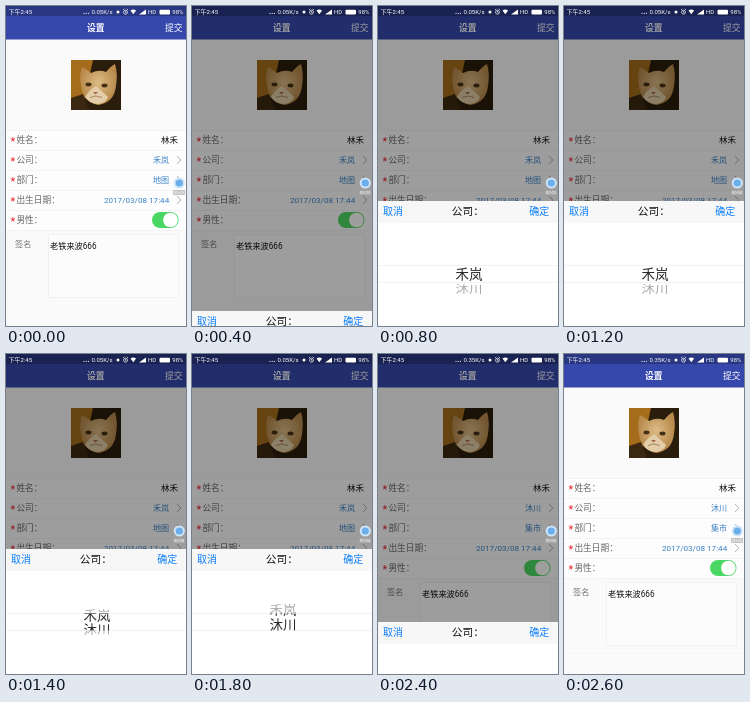
Recreate the animation shown at these times as an HTML page. Size 180 by 320 pixels, loop 2800 ms.

```html
<!DOCTYPE html>
<html lang="zh-CN">
<head>
<meta charset="utf-8">
<title>设置</title>
<style>
  html, body { margin: 0; width: 100%; height: 100%; overflow: hidden; background: #fafafa; }
  svg { display: block; width: 100%; height: 100%; }
  text { font-family: Roboto, "Noto Sans CJK SC", "Noto Sans CJK", sans-serif; }
  .end { text-anchor: end; }
  .mid { text-anchor: middle; }
  .status { font-size: 6px; fill: #fff; }
  .label { font-size: 8.7px; fill: #666; }
  .value { font-size: 8.1px; fill: #3b82c6; }
  .button { font-size: 10px; fill: #087dfa; }
  .wheel { font-size: 13.5px; }
</style>
</head>
<body>
<svg viewBox="0 0 180 320" preserveAspectRatio="none">
  <defs>
    <clipPath id="inside"><path d="M0 64.5h180v17H0z"/></clipPath>
    <clipPath id="outside"><path d="M0 22h180v42.5H0zM0 81.5h180V125H0z"/></clipPath>
    <clipPath id="photo"><path d="M65 54h50v50H65z"/></clipPath>
    <radialGradient id="fur" cy=".45">
      <stop stop-color="#dcbb86"/><stop offset="1" stop-color="#b88a4c"/>
    </radialGradient>
  </defs>

  <rect width="180" height="320" fill="#fafafa"/>
  <rect width="180" height="33.5" fill="#3648ac"/>
  <rect width="180" height="10" opacity=".25"/>
  <text class="mid" x="89.8" y="25.2" font-size="8.8" font-weight="700" fill="#fff">设置</text>
  <text class="end" x="176.5" y="25.2" font-size="8.8" fill="#fff">提交</text>

  <g clip-path="url(#photo)">
    <path d="M65 54h50v50H65z" fill="#2b1d0c"/>
    <path d="M65 54h22l-4 18-7 32H65z" fill="#a56d1b"/>
    <path d="M65 92l12-4 6 16H65z" fill="#3b2810"/>
    <path d="M75 80Q73 70 76 61Q82 64 85 67Q93 63 100 66Q105 60 109 58Q112 68 110 80Q108 97 92 99Q77 96 75 80z" fill="url(#fur)"/>
    <path d="M90 80Q83 84 79 91Q84 98 92 98Q100 97 102 91Q96 85 90 80z" fill="#e2cda8"/>
    <ellipse cx="82.5" cy="78.5" rx="3" ry="1.9" fill="#453015"/>
    <ellipse cx="98.5" cy="79.5" rx="3" ry="1.9" fill="#453015"/>
    <path d="M87 86h5l-2.5 2.5z" fill="#a86250"/>
    <path d="M84 91.5q6-3 12 0" fill="none" stroke="#8a6a46" stroke-width=".7"/>
  </g>

  <rect y="124" width="180" height="100" fill="#fdfdfd"/>
  <g id="rows"></g>
  <rect x="146" y="206" width="26.5" height="16" rx="8" fill="#4bd763"/>
  <circle cx="164.4" cy="214" r="7.3" fill="#fff"/>
  <text x="9" y="241" font-size="8.2" fill="#777">签名</text>
  <rect x="42.5" y="228.5" width="130" height="63" fill="#fcfcfc" stroke="#f1f1f1"/>
  <text x="44" y="243" font-size="8.2" fill="#111">老铁来波666</text>
  <path d="M0 299.5h180" stroke="#f6f6f6"/>

  <rect id="dim" width="180" height="320" opacity=".38"/>

  <g id="panel">
    <rect width="180" height="125" fill="#fff"/>
    <rect width="180" height="22" fill="#f7f7f7"/>
    <text class="button" x="5" y="14">取消</text>
    <text x="73.8" y="14" font-size="10.7" fill="#111">公司：</text>
    <text class="button end" x="171.2" y="14">确定</text>
    <path d="M0 64.5h180M0 81.5h180" stroke="#f2f2f2"/>
    <g class="wheel mid" clip-path="url(#outside)" fill="#a8a8a8" data-squash=".82"></g>
    <g class="wheel mid" clip-path="url(#inside)" fill="#2a2a2a" data-squash="1"></g>
  </g>

  <g>
    <text class="status" x="2.5" y="8.2">下午2:45</text>
    <g fill="#fff"><circle cx="78" cy="7.3" r=".6"/><circle cx="80.2" cy="7.3" r=".6"/><circle cx="82.4" cy="7.3" r=".6"/></g>
    <text class="status end" id="speed" x="106.5" y="8.2"></text>
    <circle cx="112" cy="6" r="1.5" fill="#fff"/>
    <g fill="none" stroke="#fff" stroke-width=".7">
      <circle cx="119.5" cy="6.2" r="2"/>
      <path d="M119.5 5v1.4h1M117 4l1.3-1.2M122 4l-1.3-1.2"/>
    </g>
    <path d="M124.5 4.5q2.8-2.2 5.6 0L127.3 8.3zM133 8.5L140 3.5v5z" fill="#fff"/>
    <rect x="153.5" y="3.8" width="10.5" height="4.6" rx="1" fill="#fff"/>
    <text class="status" x="142" y="8.2">HD</text>
    <text class="status end" x="177.5" y="8.2">98%</text>
  </g>

  <circle cx="173.3" cy="177" r="4.6" fill="#6aaeec" stroke="#cfe4f7" stroke-width="2"/>
  <rect x="167" y="184" width="12" height="5" rx="1" fill="#aaa" opacity=".7"/>
  <text class="mid" id="timer" x="173" y="188.1" font-size="4.2" fill="#fff"></text>
</svg>
<script>
  const LOOP = 2800, STEP = 200;
  const companies = ["禾岚", "沐川"];
  const departments = ["地图", "集市"];
  const byId = id => document.getElementById(id);

  // Each key is [start time, value]; values hold until the next key.
  const panelTop = [[0, 320], [400, 305], [600, 217], [800, 195], [2400, 268], [2600, 320]];
  const wheelTurn = [[0, 0], [1400, .47], [1600, .75], [1800, .83], [2000, .95], [2200, 1]];
  const held = (keys, t) => keys.filter(([start]) => start <= t).pop()[1];

  const rows = [
    ["姓名：", "林禾"], ["公司：", "", "company"], ["部门：", "", "department"],
    ["出生日期：", "2017/03/08 17:44", "birth"], ["男性：", ""]
  ];
  byId("rows").innerHTML = rows.map(([label, value, id], i) => {
    const y = 124 + i * 20;
    const field = id
      ? `<text id="${id}" class="value end" x="163.2" y="${y + 13}">${value}</text>
         <path d="M171 ${y + 6}l3.8 4-3.8 4" fill="none" stroke="#b0b0b0"/>`
      : `<text class="end" x="172" y="${y + 13}" font-size="8.5" fill="#111">${value}</text>`;
    return `<path d="M0 ${y + .5}h180" stroke="#f3f3f3"/>
      <text x="4.5" y="${y + 15}" font-size="11" fill="#e8202a">*</text>
      <text class="label" x="10.4" y="${y + 13}">${label}</text>${field}`;
  }).join("") + '<path d="M0 224.5h180" stroke="#f3f3f3"/>';

  const wheels = [...document.querySelectorAll(".wheel")];
  for (const wheel of wheels)
    wheel.innerHTML = companies.map(name => `<text y="5">${name}</text>`).join("");

  function turnWheel(turn) {
    const itemAngle = Math.PI / 10, radius = 50;
    for (const wheel of wheels) {
      [...wheel.children].forEach((item, i) => {
        const angle = (i - turn) * itemAngle;
        const scaleY = Math.cos(angle) * wheel.dataset.squash;
        item.setAttribute("transform",
          `translate(91 ${73 + radius * Math.sin(angle)}) scale(1 ${scaleY})`);
      });
    }
  }

  function draw(now) {
    const t = Math.floor(now % LOOP / STEP) * STEP;
    const chosen = t >= 2200 ? 1 : 0;
    byId("company").textContent = companies[chosen];
    byId("department").textContent = departments[chosen];
    byId("speed").textContent = t >= 2000 ? "0.35K/s" : "0.05K/s";
    byId("timer").textContent = t >= 1200 ? "00:04" : "00:03";
    byId("dim").style.display = t >= 400 && t < 2600 ? "" : "none";
    byId("panel").setAttribute("transform", `translate(0 ${held(panelTop, t)})`);
    turnWheel(held(wheelTurn, t));
  }

  const start = performance.now();
  function tick() {
    draw(performance.now() - start);
    requestAnimationFrame(tick);
  }
  tick();
</script>
</body>
</html>
```
